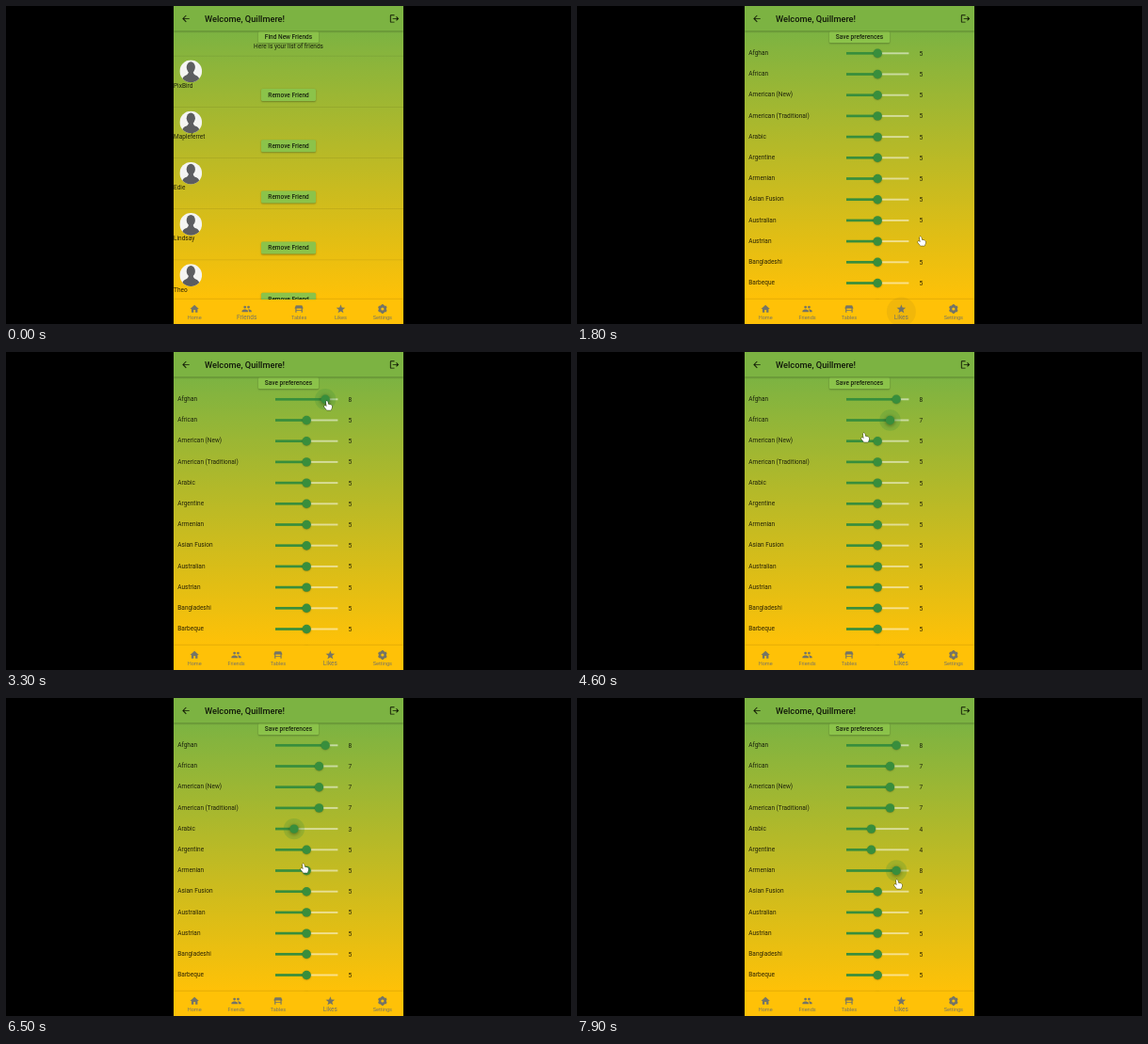
These frames come from a looping animation (600 px wide and 338 px high, 8000 ms). An HTML page with a canvas:

```html
<!DOCTYPE html>
<html lang="en">
<head>
<meta charset="utf-8">
<title>Food preferences</title>
<style>
  html, body { margin: 0; width: 100%; height: 100%; overflow: hidden; background: #000; }
  canvas { display: block; width: 100vw; height: 100vh; }
</style>
</head>
<body>
<canvas id="stage"></canvas>
<script>
const W = 600, H = 338, LOOP = 8000, STEP = 100;
const LEFT = 178, WIDTH = 244, BAR = 26.5, NAV = 312;
const INK = 'rgba(0,0,0,0.82)', GREY = '#757566', GREEN = '#388e3c';

const canvas = document.getElementById('stage');
const ctx = canvas.getContext('2d');
const ratio = window.devicePixelRatio || 1;
canvas.width = W * ratio;
canvas.height = H * ratio;

const friends = ['PixBird', 'Mapleferret', 'Edie', 'Lindsay', 'Theo'];
const cuisines = ['Afghan', 'African', 'American (New)', 'American (Traditional)', 'Arabic',
  'Argentine', 'Armenian', 'Asian Fusion', 'Australian', 'Austrian', 'Bangladeshi', 'Barbeque', ''];

// Per slider: when it is held, and [time, value] steps.
const drags = [
  { from: 2900, to: 3600, steps: [[3100, 6], [3200, 7], [3300, 8]] },
  { from: 3800, to: 4700, steps: [[3900, 6], [4000, 7]] },
  { from: 4800, to: 5200, steps: [[4900, 6], [5000, 7]] },
  { from: 5500, to: 5900, steps: [[5600, 6], [5700, 7]] },
  { from: 6000, to: 6700, steps: [[6100, 4], [6200, 3], [6600, 4]] },
  { from: 7200, to: 7700, steps: [[7200, 4]] },
  { from: 7500, to: 9000, steps: [[7500, 6], [7600, 7], [7900, 8]] }
];

// Pointer stops: time, x, y.
const pointer = [
  [700, 404, 336], [1100, 354, 327], [1400, 354, 327], [1800, 366, 250], [2100, 352, 136],
  [2900, 320, 57], [3000, 320, 57], [3300, 342, 57], [3500, 342, 57], [3800, 320, 79],
  [4000, 333, 79], [4100, 333, 79], [4400, 306, 91], [4600, 306, 91], [4800, 320, 100],
  [5000, 333, 101], [5300, 321, 122], [5500, 321, 122], [5700, 334, 123], [6000, 320, 144],
  [6200, 306, 145], [6400, 308, 147], [6500, 317, 181], [6600, 311, 146], [6700, 314, 167],
  [7200, 313, 167], [7500, 324, 188], [7700, 341, 198]
];

const arrowIcon = new Path2D('M20 11H7.8l5.6-5.6L12 4l-8 8 8 8 1.4-1.4L7.8 13H20z');
const exitIcon = new Path2D('M17 7l-1.4 1.4L18.2 11H8v2h10.2l-2.6 2.6L17 17l5-5zM4 5h8V3H4Q2 3 2 5v14q0 2 2 2h8v-2H4z');
const homeIcon = new Path2D('M10 20v-6h4v6h5v-8h3L12 3 2 12h3v8z');
const tableIcon = new Path2D('M5 4h14l3 7H2zM4 11h2.5v9H4zM17.5 11H20v9h-2.5zM6 14h12v2H6z');
const bodyIcon = new Path2D('M1 19v-2.5C1 14 5.5 13 8 13s7 1 7 3.5V19zM16.8 19v-2.5q0-2-1.8-3.4C18 12.8 23 14 23 16.5V19z');
const handIcon = new Path2D('M-2.2-4.2Q-1.2-5.8-.4-4.2L.2-1.5 3.2-.7Q4.6-.2 4.2 1.4L3.2 4.8H-1.4L-4 1.2Q-4.2-.2-3-.1L-1.5 1z');

const clamp = v => Math.max(0, Math.min(1, v));
const fade = (t, a, b) => clamp((t - a) / (b - a));

function text(str, x, y, size = 6.5, align = 'left', color = INK, weight = 400) {
  ctx.font = `${weight} ${size}px Roboto, sans-serif`;
  ctx.textAlign = align;
  ctx.textBaseline = 'alphabetic';
  ctx.fillStyle = color;
  ctx.fillText(str, x, y);
}

function rect(x, y, w, h, color) {
  ctx.fillStyle = color;
  ctx.fillRect(x, y, w, h);
}

function disc(x, y, r, color) {
  ctx.fillStyle = color;
  ctx.beginPath();
  ctx.arc(x, y, r, 0, Math.PI * 2);
  ctx.fill();
}

function shadow(color, blur, dy) {
  ctx.shadowColor = color;
  ctx.shadowBlur = blur * ratio;
  ctx.shadowOffsetY = dy * ratio;
}

function button(label, y, w, h) {
  ctx.save();
  shadow('rgba(0,0,0,0.35)', 1.8, 0.8);
  ctx.fillStyle = '#8bc34a';
  ctx.beginPath();
  ctx.roundRect(300 - w / 2, y - h / 2, w, h, 1.5);
  ctx.fill();
  ctx.restore();
  text(label, 300, y + 2.2, 6.5, 'center', INK, 500);
}

function icon(path, x, y, color, size = 11.2) {
  ctx.save();
  ctx.translate(x - size / 2, y - size / 2);
  ctx.scale(size / 24, size / 24);
  ctx.fillStyle = color;
  ctx.fill(path);
  ctx.restore();
}

function spokes(x, y, count, outer, inner) {
  ctx.fillStyle = GREY;
  ctx.beginPath();
  for (let i = 0; i < count * 2; i++) {
    const a = -Math.PI / 2 + i * Math.PI / count, r = i % 2 ? inner : outer;
    ctx.lineTo(x + r * Math.cos(a), y + r * Math.sin(a));
  }
  ctx.fill();
}

function gear(x, y) {
  ctx.lineWidth = 2.6;
  ctx.strokeStyle = GREY;
  ctx.beginPath();
  ctx.arc(x, y, 2.9, 0, Math.PI * 2);
  ctx.stroke();
  for (let i = 0; i < 6; i++) {
    ctx.save();
    ctx.translate(x, y);
    ctx.rotate(i * Math.PI / 3 + Math.PI / 6 * 0);
    rect(-1.1, -4.9, 2.2, 2, GREY);
    ctx.restore();
  }
}

function group(x, y) {
  disc(x - 1.9, y - 1.9, 1.4, GREY);
  disc(x + 1.9, y - 1.9, 1.4, GREY);
  icon(bodyIcon, x, y, GREY);
}

const tabs = [
  ['Home', (x, y) => icon(homeIcon, x, y, GREY)],
  ['Friends', group],
  ['Tables', (x, y) => icon(tableIcon, x, y, GREY)],
  ['Likes', (x, y) => spokes(x, y + 0.3, 5, 5, 2.1)],
  ['Settings', gear]
];

function avatar(x, y) {
  ctx.save();
  ctx.beginPath();
  ctx.arc(x, y, 11.8, 0, Math.PI * 2);
  ctx.clip();
  rect(x - 12, y - 12, 24, 24, '#f4f4f2');
  ctx.fillStyle = '#5c5d60';
  ctx.beginPath();
  ctx.ellipse(x, y - 4.2, 4.6, 5.8, 0, 0, Math.PI * 2);
  ctx.fill();
  ctx.beginPath();
  ctx.moveTo(x - 2.4, y);
  ctx.lineTo(x + 2.4, y);
  ctx.quadraticCurveTo(x + 2.4, y + 3.6, x + 6, y + 4.6);
  ctx.quadraticCurveTo(x + 9.5, y + 6, x + 9.5, y + 12);
  ctx.lineTo(x - 9.5, y + 12);
  ctx.quadraticCurveTo(x - 9.5, y + 6, x - 6, y + 4.6);
  ctx.quadraticCurveTo(x - 2.4, y + 3.6, x - 2.4, y);
  ctx.fill();
  ctx.restore();
}

function friendsPage() {
  button('Find New Friends', 33, 64, 12.6);
  text('Here is your list of friends', 300, 45.3, 6.5, 'center');
  friends.forEach((name, i) => {
    const y = 52.8 + i * 54.2;
    rect(LEFT, y, WIDTH, 0.6, 'rgba(0,0,0,0.13)');
    avatar(196.3, y + 16.5);
    text(name, LEFT, y + 34);
    button('Remove Friend', y + 41.7, 58, 13);
  });
}

function slider(i, t) {
  const y = 50.3 + i * 22.2, drag = drags[i];
  let value = 5, glow = 0;
  if (drag) {
    for (const [at, v] of drag.steps) if (t >= at) value = v;
    glow = fade(t, drag.from - 100, drag.from + 100) * (1 - fade(t, drag.to, drag.to + 200));
  }
  const x = 286 + value * 6.64;
  text(cuisines[i], 182.3, y + 1.7);
  rect(x, y - 0.95, 352.4 - x, 1.9, 'rgba(255,255,255,0.52)');
  rect(286, y - 1.35, x - 286, 2.7, GREEN);
  if (glow) disc(x, y, 7 + 4.2 * glow, `rgba(56,142,60,${0.22 * glow})`);
  ctx.save();
  shadow(`rgba(0,0,0,${0.3 + 0.15 * glow})`, 1.5 + 2.5 * glow, 0.5 + 0.5 * glow);
  disc(x, y, 4.7, GREEN);
  ctx.restore();
  text(String(value), 365.3, y + 2.5, 6.5, 'center');
}

function likesPage(t) {
  button('Save preferences', 33, 64, 12.6);
  cuisines.forEach((_, i) => slider(i, t));
}

function appBar() {
  ctx.save();
  shadow('rgba(0,0,0,0.4)', 2, 0.7);
  rect(LEFT, 0, WIDTH, BAR, '#7cb342');
  ctx.restore();
  icon(arrowIcon, 191, 13.4, '#111a05');
  icon(exitIcon, 412.5, 13.4, '#111a05');
  text('Welcome, Quillmere!', 211, 16.7, 9.25, 'left', 'rgba(0,0,0,0.87)', 500);
}

function navBar(t) {
  const p = fade(t, 1300, 1600);
  ctx.save();
  shadow('rgba(0,0,0,0.25)', 2, -0.4);
  rect(LEFT, NAV, WIDTH, H - NAV, '#ffc107');
  ctx.restore();
  const unit = WIDTH / 5.5;
  let x = LEFT;
  tabs.forEach(([label, draw], i) => {
    const on = i === 1 ? 1 - p : i === 3 ? p : 0;
    const w = unit * (1 + on / 2), mid = x + w / 2;
    if (i === 3 && t >= 1300) {
      const a = 0.1 * (1 - fade(t, 1700, 2100));
      disc(mid, 325, 15.5, `rgba(70,70,60,${a})`);
    }
    draw(mid, 322);
    text(label, mid, 333.4 - on * 0.2, 5.57 + 0.93 * on, 'center', GREY);
    x += w;
  });
}

function hand(t) {
  if (t < pointer[0][0]) return;
  let i = 0;
  while (i < pointer.length - 1 && t >= pointer[i + 1][0]) i++;
  const a = pointer[i], b = pointer[i + 1] || a;
  const k = a === b ? 0 : fade(t, a[0], b[0]);
  ctx.save();
  ctx.translate(a[1] + (b[1] - a[1]) * k, a[2] + (b[2] - a[2]) * k);
  ctx.lineJoin = 'round';
  ctx.lineWidth = 1;
  ctx.strokeStyle = 'rgba(30,30,20,0.8)';
  ctx.stroke(handIcon);
  ctx.fillStyle = '#fff';
  ctx.fill(handIcon);
  ctx.restore();
}

function render(t) {
  ctx.setTransform(ratio, 0, 0, ratio, 0, 0);
  rect(0, 0, W, H, '#000');
  ctx.save();
  ctx.beginPath();
  ctx.rect(LEFT, 0, WIDTH, H);
  ctx.clip();
  const sky = ctx.createLinearGradient(0, BAR, 0, NAV);
  sky.addColorStop(0, '#7cb342');
  sky.addColorStop(1, '#ffc107');
  rect(LEFT, 0, WIDTH, H, sky);
  if (t < 1400) friendsPage();
  else likesPage(t);
  appBar();
  navBar(t);
  hand(t);
  ctx.restore();
}

function tick() {
  const t = performance.now() % LOOP;
  render(Math.floor(t / STEP) * STEP);
  requestAnimationFrame(tick);
}
tick();
</script>
</body>
</html>
```
